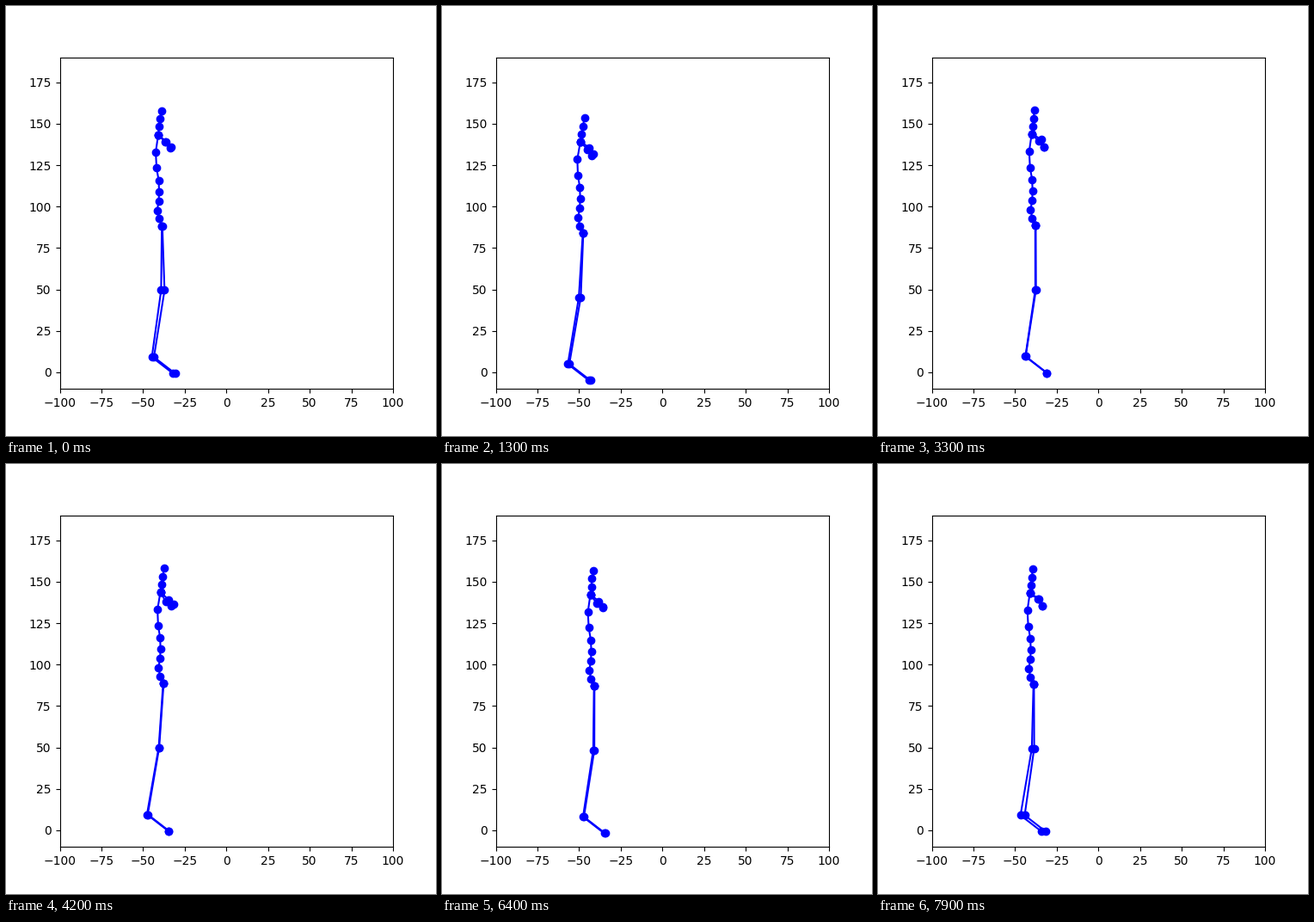
Animation of 500 by 500 pixels, one loop 8000 ms. Source, as a matplotlib script:

```python
import numpy as np
import matplotlib.pyplot as plt
from matplotlib.animation import FuncAnimation

FRAMES, STEP = 80, 100  # frame count, ms per frame

# turning points of the hip's sideways drift: seconds, x
DRIFT = [(0, -38.6), (1.3, -47.6), (1.8, -39.9), (2.2, -41.4), (2.7, -37.7),
         (4.2, -37.8), (4.5, -40.9), (5.3, -40.9), (5.8, -39.4), (6.4, -40.9),
         (7.0, -34.2), (7.5, -40.4), (7.9, -38.8)]

# spine curve from head to hip, relative to the hip
SPINE = np.array([
    (-0.4, 69.6), (-1.3, 64.6), (-1.8, 59.9), (-2.3, 55.2), (-3.8, 44.6), (-3.3, 35.0),
    (-2.0, 27.4), (-1.8, 20.9), (-2.0, 14.9), (-3.0, 9.3), (-1.9, 4.3), (0, 0)])
NECK = 3


def ease(points, t):
    """Follow the points, slowing down at each one."""
    for (t0, a), (t1, b) in zip(points, points[1:]):
        if t <= t1:
            u = (t - t0) / (t1 - t0)
            return a + (b - a) * u * u * (3 - 2 * u)
    return points[-1][1]


def bump(t, centre, width):
    return np.exp(-((t - centre) / width) ** 2)


def skeleton(t):
    back, tip = bump(t, 1.3, 0.5), bump(t, 4.2, 0.3)  # two forward tips

    # the body drifts as a whole; the tips push the feet further back
    hip = np.array([ease(DRIFT, t), 0])
    hip[1] = 88.3 + 0.47 * (hip[0] + 38.6)
    tilt = 5.5 + 0.15 * t + 3 * back + 3.5 * tip
    ankle = hip - (tilt, 79.2)
    knee = ankle + (4.65 + 0.24 * tilt, 40.4)
    toe = ankle + (12.7, -9.9)

    spine = SPINE + hip
    spine[:, 0] += (1.4 * back + tip) * (SPINE[:, 1] / SPINE[0, 1]) ** 3
    neck = spine[NECK]
    droop = 0.1 + 0.45 * np.cos(2 * np.pi * (t - 4.2) / 2.3) + 0.4 * tip
    elbow = neck + (4.85 - droop, -4.15 - droop)
    hand = neck + (7.4, -7.9)

    # half the gap between the left and right joint
    elbow_gap = 0.8 - 0.6 * (t / 3.95 - 1) ** 4
    hand_gap = 0.2 + 0.3 * back + 0.6 * tip
    knee_gap = 0.15 + 0.045 * (t - 4.4) ** 2
    foot_gap = 0.05 + 0.6 * bump(t, 0.3, 1.5) + 1.2 * (bump(t, 5.3, 0.8) + bump(t, 7.9, 0.8))

    limbs = [spine]
    for side in (-1, 1):
        limbs.append([neck,
                      elbow + side * elbow_gap * np.array([1, 0.7]),
                      hand + side * hand_gap * np.array([1, 0.9])])
        limbs.append([hip + (side * 0.15, 0),
                      knee + (side * knee_gap, 0),
                      ankle + (side * foot_gap, 0),
                      toe + (side * foot_gap, 0)])
    return limbs


fig, ax = plt.subplots(figsize=(5, 5), dpi=100)
ax.set_xlim(-100, 100)
ax.set_ylim(-10, 190)
lines = [ax.plot([], [], "bo-")[0] for _ in range(5)]


def update(frame):
    for line, pts in zip(lines, skeleton(frame * STEP / 1000)):
        line.set_data(*np.transpose(pts))
    return lines


anim = FuncAnimation(fig, update, frames=FRAMES, interval=STEP,
                     repeat=True, repeat_delay=0)
plt.show()
```
